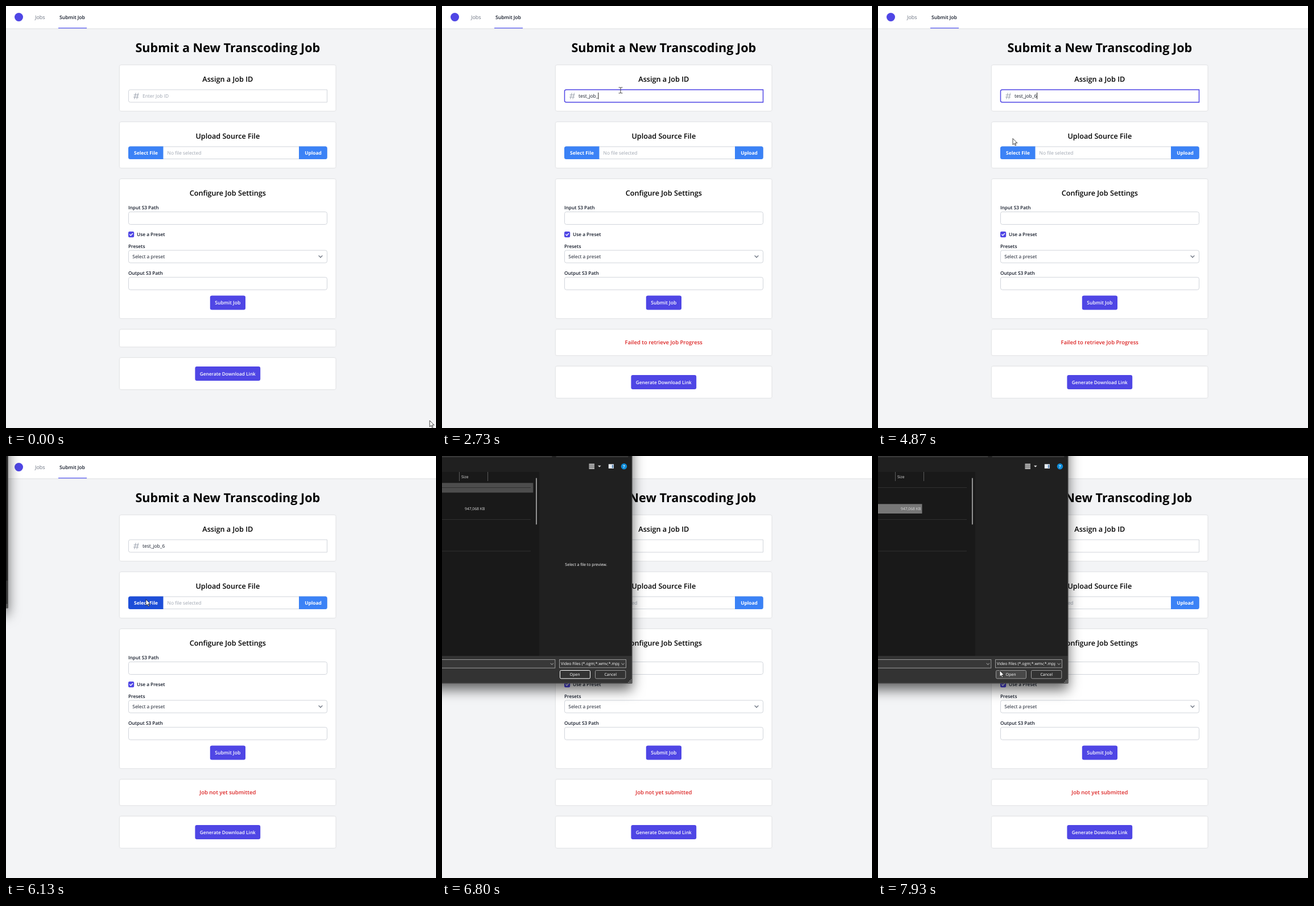
Write an HTML page that moves like this. It is 756x741 px and loops after 8 s.

```html
<!DOCTYPE html>
<html lang="en">
<head>
<meta charset="utf-8">
<title>Submit a New Transcoding Job</title>
<style>
html, body { margin: 0; width: 100%; height: 100%; overflow: hidden; background: #f3f4f6; }
svg { display: block; width: 756px; height: 741px; }
text { font: 400 8.4px "Open Sans", "Noto Sans", sans-serif; fill: #111827; text-rendering: geometricPrecision; white-space: pre; }
.title { font-size: 21.6px; font-weight: 700; fill: #000; text-anchor: middle; }
.head { font-size: 12.65px; font-weight: 600; fill: #000; text-anchor: middle; }
.label { font-size: 8.3px; font-weight: 600; }
.btn { font-weight: 600; fill: #fff; text-anchor: middle; }
.bold { font-weight: 700; }
.hint { fill: #9ca3af; }
.status { font-size: 9.5px; font-weight: 600; text-anchor: middle; }
.card { fill: #fff; filter: drop-shadow(0 .7px 1px rgba(0,0,0,.17)); }
.field { fill: #fff; stroke: #d1d5db; }
.line { fill: none; stroke-linecap: round; stroke-linejoin: round; }
.indigo { fill: #4f46e5; }
.blue { fill: #3b82f6; }
#dialog text { font-size: 7px; fill: #fff; }
#dialog .mid { text-anchor: middle; }
#dialog .size { font-size: 6.8px; fill: #ddd; }
#frame { filter: drop-shadow(0 11px 11px rgba(0,0,0,.6)); }
.box { fill: #383838; stroke: #9b9b9b; }
.rule { stroke: #303030; }
</style>
</head>
<body>
<svg viewBox="0 0 756 741">
  <defs><clipPath id="clip"><rect x="207" y="357" width="104.5" height="16"/></clipPath></defs>

  <rect width="756" height="741" fill="#f3f4f6"/>
  <rect class="card" x="-5" y="-5" width="766" height="44.3"/>
  <circle class="indigo" cx="22.5" cy="19.5" r="7.5"/>
  <text x="51" y="23.3" style="font-size:9px;fill:#6b7280">Jobs</text>
  <text class="label" x="94" y="23.3" style="font-size:8.6px">Submit Job</text>
  <rect x="92" y="38" width="50" height="1.4" fill="#6366f1"/>

  <text class="title" x="389.8" y="81">Submit a New Transcoding Job</text>

  <rect class="card" x="200" y="104" width="379.5" height="80" rx="2.5"/>
  <text class="head" x="389.8" y="132.7">Assign a Job ID</text>
  <path id="ring" class="field" d="M218.5 147H564.5V169H218.5Q215.5 169 215.5 166V150Q215.5 147 218.5 147Z"/>
  <path class="line" stroke="#9ca3af" d="M228.2 153L225.8 163M232.4 153L230 163M225 156H233.3M224.4 160H232.7"/>
  <text id="jobId" x="240" y="160.9"></text>
  <rect id="caret" y="152" width=".9" height="11.5" fill="#111"/>

  <rect class="card" x="200" y="204" width="379.5" height="80" rx="2.5"/>
  <text class="head" x="389.8" y="232.7">Upload Source File</text>
  <rect class="field" x="215.5" y="247" width="349" height="21.5" rx="3"/>
  <path id="pick" d="M276.5 246.5H218.5Q215 246.5 215 250V265.5Q215 269 218.5 269H276.5Z"/>
  <path class="blue" d="M515 246.5H561.5Q564.7 246.5 564.7 250V265.5Q564.7 269 561.5 269H515Z"/>
  <text class="btn bold" x="246" y="260.8">Select File</text>
  <text class="hint" x="283.6" y="260.8">No file selected</text>
  <text class="btn bold" x="540" y="260.8">Upload</text>

  <rect class="card" x="200" y="304" width="379.5" height="244.3" rx="2.5"/>
  <text class="head" x="389.8" y="332.6">Configure Job Settings</text>
  <text class="label" x="215" y="356.7">Input S3 Path</text>
  <rect class="field" x="215.5" y="361.5" width="349" height="22" rx="3.2"/>
  <rect class="indigo" x="215" y="396" width="10.2" height="10.2" rx="2.2"/>
  <path class="line" stroke="#fff" stroke-width="1.4" d="M217.7 401.3L219.4 403L222.6 399.5"/>
  <text class="label" x="230" y="404.4">Use a Preset</text>
  <text class="label" x="215" y="424.5">Presets</text>
  <rect class="field" x="215.5" y="429" width="349" height="22" rx="3.2"/>
  <text x="222.3" y="443.2">Select a preset</text>
  <path class="line" stroke="#6b7280" stroke-width="1.2" d="M550 438.5L553 441.5L556 438.5"/>
  <text class="label" x="215" y="471.8">Output S3 Path</text>
  <rect class="field" x="215.5" y="476.3" width="349" height="22" rx="3.2"/>
  <rect class="indigo" x="358.8" y="508.4" width="62.2" height="25" rx="3.2"/>
  <text class="btn" x="389.8" y="524" style="font-size:8.6px">Submit Job</text>

  <rect id="statusCard" class="card" x="200" y="568.3" width="379.5" rx="2.5"/>
  <text id="status" class="status" x="389.8" y="594.3"></text>
  <g id="link">
    <rect class="card" x="200" y="618" width="379.5" height="55" rx="2.5"/>
    <rect class="indigo" x="332.4" y="633" width="114.8" height="25" rx="3.2"/>
    <text class="btn" x="389.8" y="648.6" style="font-size:8.25px">Generate Download Link</text>
  </g>

  <g id="dialog">
    <rect id="frame" x="-500" y="-300" width="834.3" height="699.3" fill="#333"/>
    <rect x="-500" y="-300" width="834" height="328" fill="#202020"/>
    <rect x="-500" y="28" width="671" height="323" fill="#191919"/>
    <rect x="171" y="28" width="163" height="323" fill="#202020"/>
    <path class="line" stroke="#555" d="M-500 1.2H193M201 1.2H327"/>
    <path class="line" stroke="#5a5a5a" stroke-width=".8" d="M334 -300V399H-500"/>
    <rect x="258.5" y="13.5" width="9.5" height="9.5" fill="#bbb"/>
    <path stroke="#555" stroke-width=".8" d="M258.5 16H268M258.5 18.3H268M258.5 20.6H268"/>
    <path fill="#ddd" d="M274 16.8H279.6L276.8 19.8Z"/>
    <rect x="292.8" y="14.3" width="9.2" height="7.6" fill="#e8eef5"/>
    <rect x="298.8" y="15.5" width="2.4" height="5.6" fill="#5b87b5"/>
    <circle cx="320" cy="18.2" r="5.2" fill="#0e8bd8"/>
    <text class="mid bold" x="320" y="20.8">?</text>
    <path stroke="#5a5a5a" d="M30.5 28V44M80.5 28V44"/>
    <text class="size" x="34" y="38.7">Size</text>
    <rect id="groupRow" x="-500" y="47.3" width="660.3" height="17" fill="#4d4d4d"/>
    <rect id="fileRow" x="-500" y="84.3" width="577.5" height="16.7"/>
    <path class="rule" d="M-500 55.5H156M-500 111.5H156M-500 167H156"/>
    <text class="size" x="40" y="95.3">947,068 KB</text>
    <rect x="165" y="38.5" width="1.8" height="82" rx=".9" fill="#a0a0a0"/>
    <text id="preview" class="mid" x="253.3" y="192.6">Select a file to preview.</text>
    <rect class="box" x="-400" y="357.5" width="598.8" height="14.8"/>
    <rect class="box" x="206.5" y="357.5" width="117" height="14.3"/>
    <path class="line" stroke="#ccc" stroke-width=".9" d="M191 364.2L193.3 366.4L195.6 364.2M315.8 364.2L318.1 366.4L320.4 364.2"/>
    <text x="209" y="367.3" clip-path="url(#clip)">Video Files (*.ogm;*.wmv;*.mpg)</text>
    <rect id="open" x="207.5" y="376.5" width="53" height="14.3" rx="2"/>
    <text class="mid" x="233.6" y="386.2">Open</text>
    <rect class="box" x="269.5" y="376.5" width="53.3" height="14.3" rx="2" style="fill:#333"/>
    <text class="mid" x="296.2" y="386.2">Cancel</text>
    <path stroke="#aaa" stroke-width="1.3" stroke-dasharray="1.3 1" d="M327.4 397.3H333M329.7 395H333M332 392.7H333"/>
  </g>

  <g id="cursor" class="line">
    <path id="arrow" fill="#fff" stroke="#222" stroke-width=".85" d="M0 0V10.6L2.5 8.3L4.2 12L5.8 11.3L4.1 7.6H7.5Z"/>
    <path id="beam" stroke="#444" stroke-width="1" d="M-3 -5H-1L0 -4.3L1 -5H3M0 -4.3V4.3M-3 5H-1L0 4.3L1 5H3"/>
    <path id="hand" fill="#fff" stroke="#222" stroke-width=".85" d="M-1 1V8L-2.5 6.4C-3.5 5.6 -4.5 6.6 -3.8 7.5L-1 11.5V14H5V11.5C6 10 6 8 6 6.5C5.8 5.5 4.8 5.5 4.2 6V5.3C3.6 4.6 2.9 4.7 2.5 5.1C2.1 4.4 1.4 4.3 1 4.5V1C.8 -.2 -.8 -.2 -1 1Z"/>
  </g>
</svg>
<script>
const LOOP = 8000, STEP = 1000 / 15, BLINK = 533;
const el = id => document.getElementById(id);
const set = (id, attrs) => { for (const k in attrs) el(id).setAttribute(k, attrs[k]); };
const show = (id, on) => el(id).style.display = on ? '' : 'none';
const write = (id, s) => { if (el(id).textContent !== s) el(id).textContent = s; };

// [time, text, start of the caret blink when not the time itself]
const typed = [
  [0, ''], [800, ''], [1070, 't'], [1270, 'te'], [1470, 'tes'], [1670, 'test'],
  [1930, 'test_'], [2070, 'test_o'], [2270, 'test_j'], [2470, 'test_jo'],
  [2530, 'test_job'], [2730, 'test_job_'], [2930, 'test_job_5'],
  [4670, 'test_job_', 2930], [4870, 'test_job_6']
];
const red = '#dc2626', green = '#2f9e57';
const statuses = [
  [0, '', red], [1270, 'Failed to retrieve Job Progress', red],
  [3270, 'Job Completed Successfully', green],
  [4870, 'Failed to retrieve Job Progress', red], [5200, 'Job not yet submitted', red]
];
const pointers = [
  [0, 'arrow'], [530, 'beam'], [3330, 'arrow'], [3670, 'hand'],
  [4130, 'arrow'], [5400, 'hand'], [6070, 'arrow']
];
const path = [
  [0, 747, 731], [200, 327, 189], [333, 327, 189], [600, 314, 148], [3200, 314, 148],
  [3600, 205, 236], [3733, 231, 248], [4000, 236, 251], [4067, 236, 251], [4267, 237, 233],
  [5200, 237, 233], [5467, 232, 248], [5933, 246, 252], [6330, 246, 252], [6530, -20, 180],
  [7400, -20, 168], [7467, 4, 177], [7667, 130, 300], [7933, 214, 377]
];
const corner = [[6067, -5, 258], [6133, 1, 266], [6333, 334, 399]];

const last = (list, t) => list.filter(k => k[0] <= t).pop();

function along(keys, t) {
  const i = keys.findIndex(k => k[0] > t);
  if (i < 0) return keys[keys.length - 1].slice(1);
  if (i === 0) return keys[0].slice(1);
  const [a, b] = [keys[i - 1], keys[i]], p = (t - a[0]) / (b[0] - a[0]);
  return [1, 2].map(n => a[n] + (b[n] - a[n]) * p);
}

function render(t) {
  const tick = Math.floor((t + 4) / STEP) * STEP + 1;

  const [since, text, blink = since] = last(typed, t);
  const focus = t >= 800 && t < 5930;
  write('jobId', text || 'Enter Job ID');
  el('jobId').setAttribute('class', text ? '' : 'hint');
  el('ring').style.cssText = focus ? 'stroke:#4f46e5;stroke-width:1.5' : '';
  show('caret', focus && (t - blink) % (2 * BLINK) < BLINK);
  set('caret', { x: 240 + (text ? el('jobId').getComputedTextLength() : 0) });

  const [, status, color] = last(statuses, t);
  write('status', status);
  el('status').style.fill = color;
  set('statusCard', { height: status ? 45 : 30 });
  set('link', { transform: `translate(0 ${status ? 15 : 0})` });

  const [, pointer] = last(pointers, t);
  for (const id of ['arrow', 'beam', 'hand']) show(id, id === pointer);
  set('cursor', { transform: `translate(${along(path, tick)})` });
  set('pick', { fill: pointer === 'hand' || t >= 6000 ? '#1d4ed8' : '#3b82f6' });

  const [right, bottom] = along(corner, tick);
  show('dialog', t >= 6067);
  set('dialog', { transform: `translate(${right - 334} ${bottom - 399})`, opacity: t < 6130 ? .6 : 1 });
  show('groupRow', t >= 6800 && t < 6930);
  set('fileRow', { fill: t < 7000 ? 'none' : t < 7200 ? '#4d4d4d' : '#777' });
  show('preview', t < 7330);
  const over = t >= 7870;
  set('open', { fill: over ? '#484848' : '#333', stroke: over || t >= 7200 ? '#9b9b9b' : '#fff' });
}

const start = performance.now();
function loop() {
  render((performance.now() - start) % LOOP);
  requestAnimationFrame(loop);
}
loop();
</script>
</body>
</html>
```
